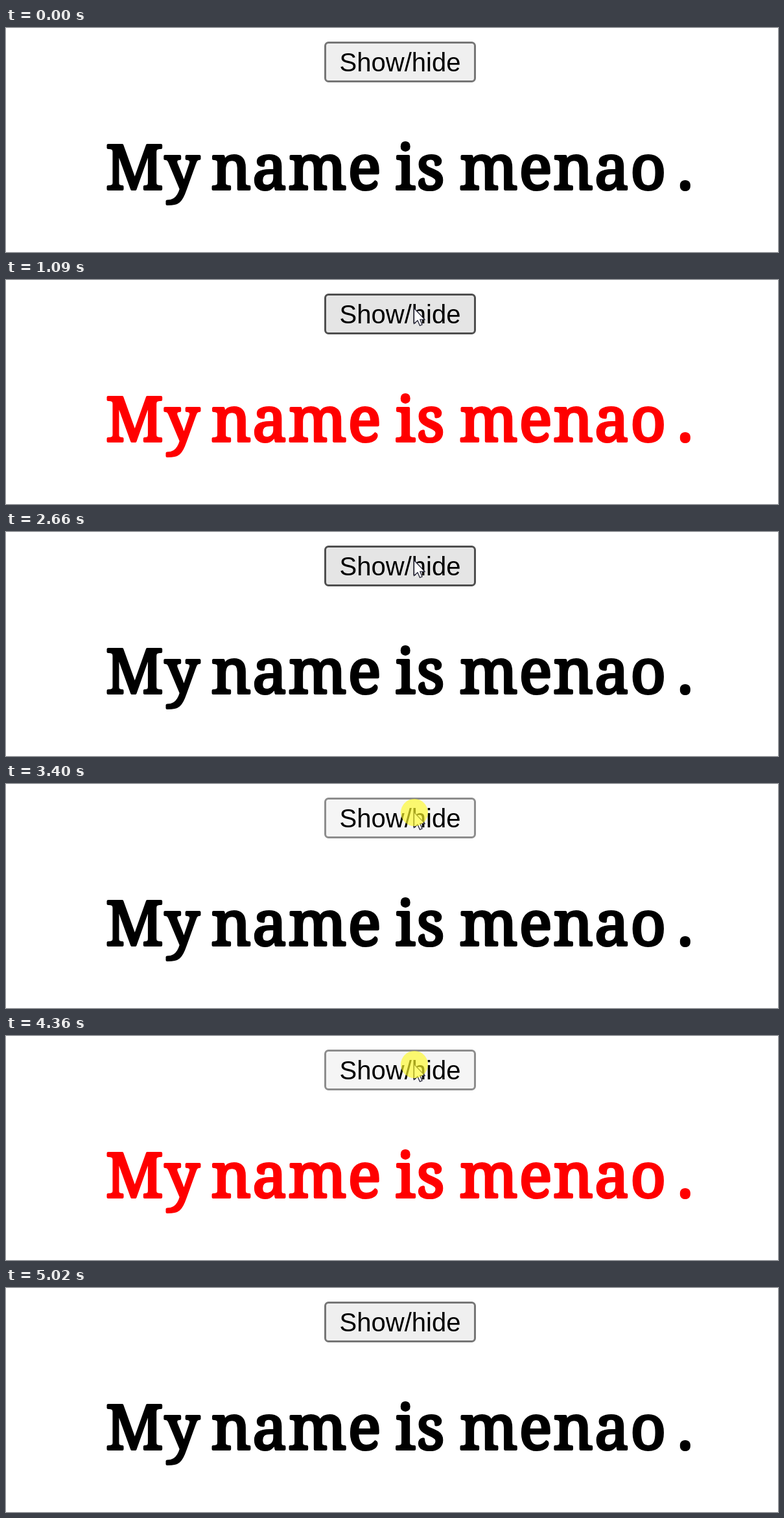
Write an HTML page that moves like this. It is 1191 by 346 pixels and loops after 6.1 s.

```html
<!DOCTYPE html>
<html lang="en">
<head>
<meta charset="utf-8">
<title>Show/hide</title>
<style>
  html, body { margin: 0; width: 100%; height: 100%; overflow: hidden; background: #fff; }
  svg { display: block; width: 1191px; height: 346px; }
  .label { font: 40px Arial, "Liberation Sans", sans-serif; text-anchor: middle; }
  .words { font: 400 94.5px "Noto Serif", serif; letter-spacing: 2.4px; stroke-width: 4.2; stroke-linejoin: round; }
</style>
</head>
<body>
<svg viewBox="0 0 1191 346">
  <rect id="button" x="492.5" y="22.5" width="231" height="60" rx="5" stroke-width="3"/>
  <text class="label" x="608" y="66.5">Show/hide</text>
  <g id="words" class="words">
    <text x="154" y="249">My</text>
    <text x="317" y="249">name</text>
    <text x="601" y="249">is</text>
    <text x="700" y="249">menao</text>
    <text x="1036" y="249">.</text>
  </g>
  <path id="cursor" d="M.5.5V24.5L6 19.5L9.5 27.5L13 26L9.8 18.2H17Z" fill="#fff" stroke="#15152a" stroke-width="1.2"/>
  <circle id="glow" cx="630" cy="44" r="21" fill="#fffa28" opacity=".65"/>
</svg>
<script>
  const LOOP = 6100, TICK = 60;
  const HOME = [629, 43], ENTRY = [975, 282], EXIT = [1082, 326];
  // each click: press, release of the mouse, reaction of the page
  const CLICKS = [[970, 1090, 1090], [2480, 2600, 2660], [3400, 3520, 3520], [4360, 4480, 4480]];
  const LOOKS = {
    idle: ["#efefef", "#767676"],
    hover: ["#e5e5e5", "#4f4f4f"],
    active: ["#f5f5f5", "#8d8d8d"]
  };
  const el = id => document.getElementById(id);
  const button = el("button"), words = el("words"), cursor = el("cursor"), glow = el("glow");

  const show = (node, on) => node.setAttribute("visibility", on ? "visible" : "hidden");
  const paint = (node, fill, stroke) => {
    node.setAttribute("fill", fill);
    node.setAttribute("stroke", stroke);
  };
  const mix = (a, b, k) => a.map((v, i) => v + (b[i] - v) * k);

  // progress in whole ticks, as the pointer was sampled
  const stepped = (t, from, to) =>
    Math.min(1, Math.max(0, Math.floor((t - from) / TICK) * TICK / (to - from)));

  function pointer(t) {
    if (t < 170 || t >= 5020) return null;
    if (t < 4540) return mix(ENTRY, HOME, 1 - (1 - stepped(t, 170, 650)) ** 2);
    return mix(HOME, EXIT, stepped(t, 4540, 4960) ** 1.6);
  }

  function draw(t) {
    const at = pointer(t);
    const over = at && at[0] > 491 && at[0] < 725 && at[1] > 21 && at[1] < 84;
    const within = end => CLICKS.some(c => t >= c[0] && t < c[end]);
    const red = CLICKS.filter(c => t >= c[2]).length % 2 === 1;
    const ink = red ? "#f00" : "#000";

    paint(button, ...LOOKS[within(2) ? "active" : over ? "hover" : "idle"]);
    paint(words, ink, ink);
    show(glow, within(1));
    show(cursor, at);
    if (at) cursor.setAttribute("transform", `translate(${at[0]} ${at[1]})`);
  }

  const start = performance.now();
  function frame(now) {
    draw(Math.max(0, now - start) % LOOP);
    requestAnimationFrame(frame);
  }
  draw(0);
  requestAnimationFrame(frame);
</script>
</body>
</html>
```
